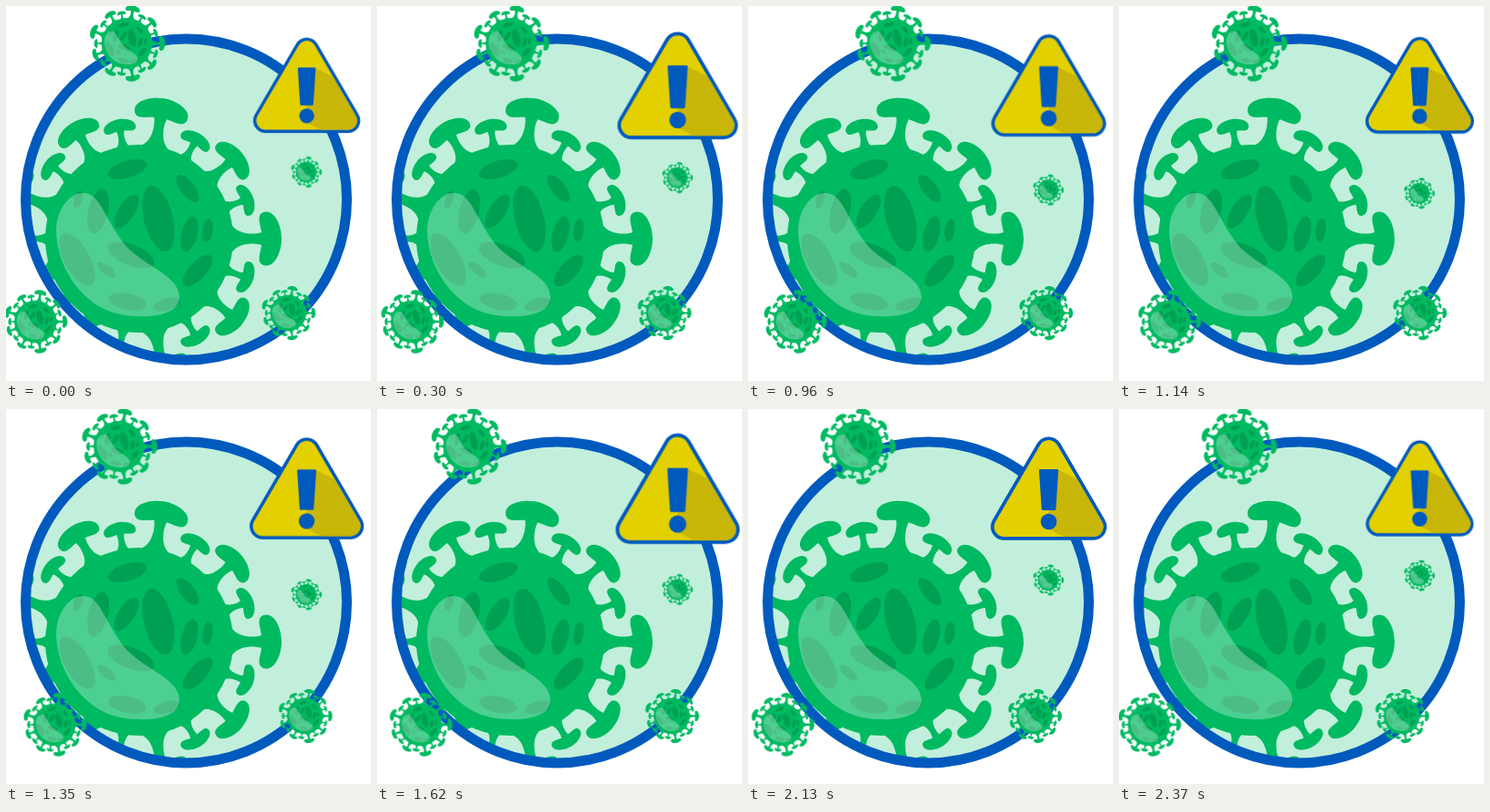
These frames come from a looping animation (400x411 px, 2.4 s). An HTML page:

```html
<!DOCTYPE html>
<html lang="en">
<head>
<meta charset="utf-8">
<title>Virus alert</title>
<style>
  html, body { margin: 0; width: 100%; height: 100%; overflow: hidden; background: #fff; }
  svg { display: block; width: 400px; height: 411px; }
</style>
</head>
<body>
<svg viewBox="0 0 400 411">
  <defs>
    <clipPath id="disc"><circle cx="197.5" cy="212" r="176"/></clipPath>
    <path id="spike" d="M-29 8C-33 -4 -15 -12 0 -12S33 -4 29 8C26 16 15 11 7 10C5 16 5 24 7 31C9 38 14 43 23 48H-23C-14 43 -9 38 -7 31C-5 24 -5 16 -7 10C-15 11 -26 16 -29 8Z"/>
    <g id="virus">
      <g id="spikes" fill="#00ba61"><circle r="103"/></g>
      <g id="spots" fill="#00a052"></g>
      <path fill="#fff" fill-opacity=".3" d="M-91 -8C-91 -32 -76 -51 -61 -50C-43 -49 -40 -27 -20 1C-3 28 44 38 44 64C44 86 4 88 -21 83C-61 75 -90 33 -91 -8Z"/>
    </g>
  </defs>

  <circle cx="197.5" cy="212" r="176" fill="#c2efdb"/>
  <g clip-path="url(#disc)"><use href="#virus" x="146" y="255"/></g>
  <circle cx="197.5" cy="212" r="176" fill="none" stroke="#005abe" stroke-width="11"/>

  <g id="small"></g>

  <g id="sign">
    <g stroke-linejoin="round">
      <path d="M0 -42.5L53 48.5H-53Z" fill="#005abe" stroke="#005abe" stroke-width="32"/>
      <path d="M0 -42.5L53 48.5H-53Z" fill="#e3d000" stroke="#e3d000" stroke-width="24"/>
    </g>
    <path fill="#c8b608" d="M11 -19L34.2 -7.7L63.4 42.5A12 12 0 0 1 53 60.5H18L-4 49Z"/>
    <g fill="#005abe">
      <path stroke="#005abe" stroke-width="3" stroke-linejoin="round" d="M-10 -18.5H10L7 27.5H-7Z"/>
      <circle cy="42.5" r="9.6"/>
    </g>
  </g>
</svg>
<script>
const NS = 'http://www.w3.org/2000/svg';
const LOOP = 2400;
const byId = id => document.getElementById(id);

function add(parent, tag, attrs) {
  const el = document.createElementNS(NS, tag);
  for (const key in attrs) el.setAttribute(key, attrs[key]);
  return parent.appendChild(el);
}

// Spikes stand every 20 degrees: large, small, medium, small.
for (let i = -6; i < 12; i++) {
  const size = i % 2 ? .6 : i % 4 ? .84 : 1;
  const reach = 98 + 46 * size;
  add(byId('spikes'), 'use', {
    href: '#spike',
    transform: `rotate(${10 + 20 * i}) translate(0 ${-reach}) scale(${size})`
  });
}

// Spots [x, y, half length] lie along rings around a point near the middle.
const spots = [
  [-13, -76, 22], [-45, -30, 25], [-14, -30, 21], [21, -22, 37], [53, -55, 18],
  [55, -5, 20], [75, -9, 13], [64, 35, 22], [-68, 23, 32], [-36, 34, 12],
  [-9, 18, 27], [-13, 69, 21], [30, 72, 15], [-67, -43, 10]
];
for (const [x, y, half] of spots) {
  const tilt = Math.atan2(y + 18, x - 5) * 180 / Math.PI;
  add(byId('spots'), 'ellipse', {
    rx: half * .43, ry: half, transform: `translate(${x} ${y}) rotate(${tilt})`
  });
}

// Moves a small virus through [x, y, offset] at constant speed between the points.
function drift(size, ...points) {
  const frames = points.map(([x, y, offset = null]) => ({
    offset, transform: `translate(${x}px, ${y}px) scale(${size})`
  }));
  add(byId('small'), 'use', { href: '#virus' })
    .animate([...frames, { ...frames[0], offset: 1 }], { duration: LOOP, iterations: Infinity });
}
drift(.27, [132.3, 41], [171.3, 41, .337], [97.5, 41, .688]);
drift(.225, [32.3, 346], [56, 346]);
drift(.192, [309.3, 336.5], [330.3, 336.5]);
drift(.11, [329, 182], [329, 206.5]);

const pulse = scale => `translate(329.5px, 84.3px) scale(${scale})`;
byId('sign').animate([
  { transform: pulse(.85), easing: 'cubic-bezier(.33, .5, .65, 1)' },
  { transform: pulse(1.003), easing: 'cubic-bezier(.3, .1, .6, .7)' },
  { transform: pulse(.85) }
], { duration: LOOP / 2, iterations: Infinity });
</script>
</body>
</html>
```
